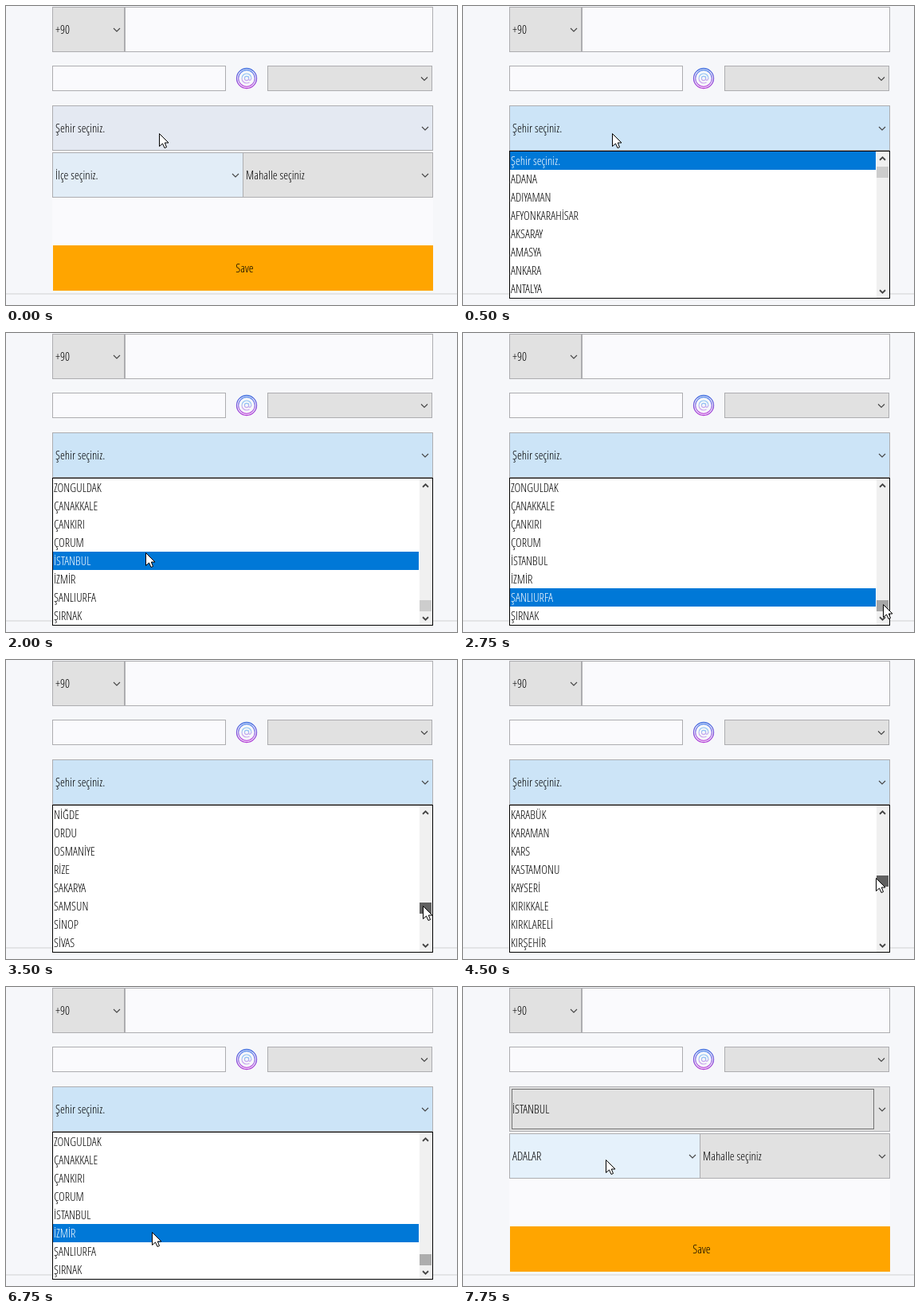
These frames come from a looping animation (566x376 px, 8000 ms). An HTML page with a canvas:

```html
<!DOCTYPE html>
<html lang="tr">
<head>
<meta charset="utf-8">
<title>Şehir seçimi</title>
<style>
html, body { margin: 0; width: 100%; height: 100%; overflow: hidden; background: #f6f7fa; font-family: "Open Sans", sans-serif; }
canvas { display: block; }
</style>
</head>
<body>
<canvas id="stage" width="566" height="376"></canvas>
<script>
const ctx = document.getElementById('stage').getContext('2d');
const LOOP = 8000, STEP = 250;
const ROW = 23, ROWS = 8, LIST_TOP = 183;
const OPEN_AT = 500, CLOSE_AT = 7250;
const DRAG_START = 3000, DRAG_END = 6225;

const cities = `ADANA ADIYAMAN AFYONKARAHİSAR AĞRI AKSARAY AMASYA ANKARA ANTALYA ARDAHAN
ARTVİN AYDIN BALIKESİR BARTIN BATMAN BAYBURT BİLECİK BİNGÖL BİTLİS BOLU BURDUR BURSA
ÇANAKKALE ÇANKIRI ÇORUM DENİZLİ DİYARBAKIR DÜZCE EDİRNE ELAZIĞ ERZİNCAN ERZURUM
ESKİŞEHİR GAZİANTEP GİRESUN GÜMÜŞHANE HAKKARİ HATAY IĞDIR ISPARTA İSTANBUL İZMİR
KAHRAMANMARAŞ KARABÜK KARAMAN KARS KASTAMONU KAYSERİ KIRIKKALE KIRKLARELİ KIRŞEHİR
KİLİS KOCAELİ KONYA KÜTAHYA MALATYA MANİSA MARDİN MERSİN MUĞLA MUŞ NEVŞEHİR NİĞDE
ORDU OSMANİYE RİZE SAKARYA SAMSUN SİİRT SİNOP SİVAS ŞANLIURFA ŞIRNAK TEKİRDAĞ TOKAT
TRABZON TUNCELİ UŞAK VAN YALOVA YOZGAT ZONGULDAK`.split(/\s+/).sort();
const options = ['Şehir seçiniz.', ...cities];
const LAST_TOP = options.length - ROWS;

const waypoints = [
  { t: 0, x: 192, y: 160 },
  { t: OPEN_AT, x: 187, y: 160 },
  { t: 1500, x: 166, y: 272 },
  { t: 2000, x: 175, y: 276 },
  { t: 2750, x: 527, y: 341 },
  { t: DRAG_START, x: 527, y: 341 },
  { t: DRAG_END, x: 527, y: 344 },
  { t: 6750, x: 183, y: 308 },
  { t: 7750, x: 179, y: 217 }
];

const mix = (a, b, p) => a + (b - a) * p;
const isDragging = t => t >= DRAG_START && t < DRAG_END;

// The thumb is pulled up and let back down in one smooth swing.
const dragSwing = t => isDragging(t)
  ? Math.sin(Math.PI * (t - DRAG_START) / (DRAG_END - DRAG_START)) : 0;

function pointerAt(t) {
  const i = waypoints.findIndex(w => w.t >= t);
  const b = waypoints[i], a = waypoints[Math.max(0, i - 1)];
  const p = a === b ? 0 : (t - a.t) / (b.t - a.t), swing = dragSwing(t);
  return { x: mix(a.x, b.x, p) - 9 * swing, y: mix(a.y, b.y, p) - 69 * swing };
}

// Wheel notches move three rows each; dragging then offsets the list.
function topOption(t) {
  const wheel = 3 * Math.floor(18 * (t - OPEN_AT) / 1000);
  return Math.min(LAST_TOP, wheel) - Math.round(36 * dragSwing(t));
}

// Prefer whichever condensed light face is available.
function chooseFont() {
  const faces = [
    ['300 condensed', '"Open Sans"'], ['300', '"Open Sans Condensed"'],
    ['300', '"Open Sans Condensed Light"'], ['300 condensed', '"Noto Sans"']
  ];
  const measured = faces.map(([style, family]) => {
    const at = size => `${style} ${size}px ${family}, sans-serif`;
    ctx.font = at(15);
    return { font: at(15), width: ctx.measureText(options[0]).width };
  });
  return measured.reduce((a, b) => b.width < a.width - 0.5 ? b : a).font;
}
const font = chooseFont();

function fill(x, y, w, h, color) {
  ctx.fillStyle = color;
  ctx.fillRect(x, y, w, h);
}

function box(x, y, w, h, color, border = '#adadb0') {
  fill(x, y, w, h, color);
  ctx.strokeStyle = border;
  ctx.lineWidth = 1;
  ctx.strokeRect(x + 0.5, y + 0.5, w - 1, h - 1);
}

function label(str, x, y, color = '#000', align = 'left') {
  ctx.font = font;
  ctx.textAlign = align;
  ctx.fillStyle = color;
  ctx.fillText(str, x, y);
}

function chevron(x, y, dir = 1, half = 4, width = 1.1) {
  ctx.strokeStyle = '#444';
  ctx.lineWidth = width;
  ctx.beginPath();
  ctx.moveTo(x - half, y - dir * half / 2);
  ctx.lineTo(x, y + dir * half / 2);
  ctx.lineTo(x + half, y - dir * half / 2);
  ctx.stroke();
}

function select(x, y, w, h, color, str = '') {
  box(x, y, w, h, color);
  label(str, x + 4, Math.round(y + h / 2 + 5));
  chevron(x + w - 10, y + h / 2 + 0.5);
}

function ring(radius, width, from, to) {
  const shade = ctx.createLinearGradient(0, 91 - radius, 0, 91 + radius);
  shade.addColorStop(0, from);
  shade.addColorStop(1, to);
  ctx.strokeStyle = shade;
  ctx.lineWidth = width;
  ctx.beginPath();
  ctx.arc(302, 91, radius, 0, Math.PI * 2);
  ctx.stroke();
}

function mailBadge() {
  ring(12.5, 1.3, '#3f70e0', '#b43bd6');
  ring(10.3, 1.2, '#5c90ee', '#c75be0');
  ring(2.6, 1.1, '#8fc4f4', '#c9a4ee');
  ctx.beginPath();
  ctx.moveTo(304.6, 88.5);
  ctx.lineTo(304.6, 92);
  ctx.quadraticCurveTo(306, 95.5, 308, 91);
  ctx.arc(302, 91, 6, 0, Math.PI * 0.3, true);
  ctx.stroke();
}

function form(t) {
  const done = t >= CLOSE_AT, open = t >= OPEN_AT && !done;
  const gray = '#e1e1e1', hover = '#e5f1fb', paper = '#fafafd';
  fill(0, 0, 566, 376, '#f6f7fa');
  fill(58, 241, 478, 60, paper);
  fill(0, 361, 566, 2, '#e3e4e6');
  select(58, 1, 91, 57, gray, '+90');
  box(149, 1, 387, 57, paper);
  box(58, 75, 218, 32, paper);
  mailBadge();
  select(328, 75, 207, 32, gray);

  const cityColor = done ? gray : open ? '#cce4f7' : t < STEP ? '#e4e9f2' : hover;
  select(58, 125, 478, 57, cityColor, done ? 'İSTANBUL' : options[0]);
  if (done) {
    ctx.strokeStyle = '#000';
    ctx.setLineDash([1, 1]);
    ctx.lineWidth = 1;
    ctx.strokeRect(61.5, 128.5, 454, 50);
    ctx.setLineDash([]);
  }
  const districtColor = t < STEP ? '#e2edf7' : t >= 7750 ? hover : gray;
  select(58, 184, 240, 57, districtColor, t >= 7500 ? 'ADALAR' : 'İlçe seçiniz.');
  select(297, 184, 239, 57, gray, 'Mahalle seçiniz');
  fill(59, 301, 477, 57, '#ffa500');
  label('Save', 299.5, 335, '#000', 'center');
}

function dropdown(t, { x, y }) {
  const top = topOption(t), onBar = x >= 517;
  const row = Math.max(0, Math.min(ROWS - 1, Math.floor((y - LIST_TOP) / ROW)));
  const active = onBar ? options.indexOf('ŞANLIURFA') : top + row;
  box(58, 182, 478, 186, '#fff', '#000');
  for (let i = 0; i < ROWS; i++) {
    const rowY = LIST_TOP + i * ROW, on = top + i === active;
    if (on) fill(59, rowY, 459, ROW, '#0078d7');
    label(options[top + i], 60, rowY + 17, on ? '#fff' : '#000');
  }
  fill(519, 183, 16, 184, '#f0f0f0');
  const thumb = isDragging(t) ? '#606060' : onBar ? '#a6a6a6' : t > DRAG_END ? '#adadad' : '#cdcdcd';
  fill(519, Math.round(336.2 - (LAST_TOP - top) * 1.82), 15, 14, thumb);
  chevron(526.5, 192, -1, 3.5, 1.8);
  chevron(526.5, 359, 1, 3.5, 1.8);
}

function pointer({ x, y }) {
  ctx.save();
  ctx.translate(Math.round(x) + 0.5, Math.round(y) + 0.5);
  ctx.beginPath();
  [[0, 0], [0, 16], [4, 12.5], [6.5, 18], [9, 17], [6.8, 11.5], [11.5, 11.5]]
    .forEach(p => ctx.lineTo(...p));
  ctx.closePath();
  ctx.fillStyle = '#fff';
  ctx.fill();
  ctx.strokeStyle = '#000';
  ctx.lineWidth = 1;
  ctx.stroke();
  ctx.restore();
}

function draw(now) {
  const t = Math.floor((now % LOOP) / STEP) * STEP;
  const tip = pointerAt(t);
  form(t);
  if (t >= OPEN_AT && t < CLOSE_AT) dropdown(t, tip);
  pointer(tip);
}

const start = performance.now();
function tick() {
  draw(performance.now() - start);
  requestAnimationFrame(tick);
}
tick();
</script>
</body>
</html>
```
